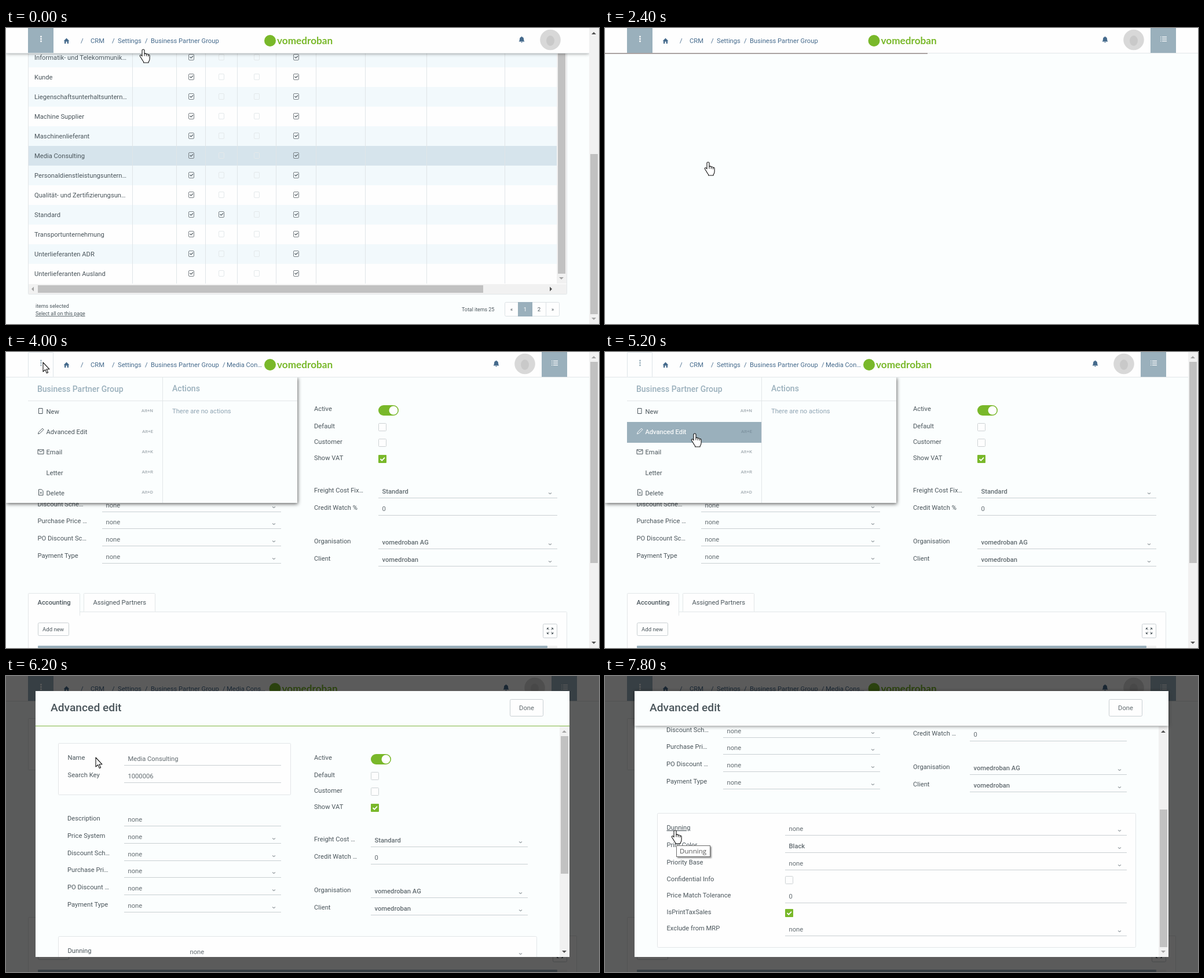
These frames come from a looping animation (1024 px wide and 512 px high, 8000 ms). An HTML page:

```html
<!DOCTYPE html>
<html lang="en">
<head>
<meta charset="utf-8">
<title>Advanced edit</title>
<style>
html, body { margin: 0; width: 100%; height: 100%; overflow: hidden; background: #fbfefe; }
svg { display: block; width: 100%; height: 100%; font-family: Roboto, sans-serif; }
.raised { filter: drop-shadow(0 1px 3px #0007); }
</style>
</head>
<body>
<svg id="stage" viewBox="0 0 1024 512"></svg>
<script>
const LOOP = 8000, STEP = 200;
const PAGE = '#fbfefe', WHITE = '#fefefe', LINE = '#e2e6e8', EDGE = '#c9cfd2';
const STEEL = '#9ab0bc', LINK = '#456a8c', LABEL = '#4a555b', VALUE = '#626b70', GREEN = '#79b82a';
const BRAND = 'vomedroban';

// Drawing helpers; text is placed by the middle of its capitals.
const rect = (x, y, w, h, fill, extra = '') =>
  `<rect x="${x}" y="${y}" width="${w}" height="${h}" fill="${fill}" ${extra}/>`;
const box = (x, y, w, h, fill = WHITE, stroke = LINE, r = 1) =>
  rect(x + .5, y + .5, w - 1, h - 1, fill, `stroke="${stroke}" rx="${r}"`);
const path = (d, stroke, extra = '') => `<path d="${d}" fill="none" stroke="${stroke}" ${extra}/>`;
const disc = (x, y, r, fill) => `<circle cx="${x}" cy="${y}" r="${r}" fill="${fill}"/>`;
const text = (x, y, str, fill = LABEL, size = 11.2, extra = '') =>
  `<text x="${x}" y="${y + size * .355}" fill="${fill}" font-size="${size}" ${extra}>${str}</text>`;
const at = (x, y, content, extra = '') => `<g transform="translate(${x} ${y}) ${extra}">${content}</g>`;
const MEDIUM = 'font-weight="500"', MIDDLE = 'text-anchor="middle"', END = 'text-anchor="end"';

const arrow = (x, y, turn, dark) =>
  at(x, y, `<path d="M-4 2L0-2L4 2z" fill="${dark ? '#505050' : '#a3a3a3'}"/>`, `rotate(${turn})`);
const scrollbar = (x, y, h, from, to, up, down) =>
  rect(x, y, 17, h, '#f1f1f1') + rect(x + 2, from, 13, to - from, '#c1c1c1') +
  arrow(x + 8, y + 9, 0, up) + arrow(x + 8, y + h - 9, 180, down);

function header(width, { button = true, shadow = false, open = false, last = '' } = {}) {
  const right = width - 38, avatar = right - (button ? 44 : 0) - 29, bell = avatar - 49.5;
  const shift = (width - 1007) / 2;
  let out = rect(0, 0, width, 43, WHITE, shadow ? 'class="raised"' : '') + rect(0, 43, width, 1, LINE);
  out += open ? box(38, 0, 44, 44, WHITE, '#dde4e8') : rect(38, 0, 44, 43, STEEL);
  for (const y of [15, 19, 23]) out += disc(60.5, y, 1.4, open ? STEEL : WHITE);
  out += `<path d="M99.500 22.500L104.500 17.500L109.500 22.500H108V27H105.700V23.500H103.300V27H101V22.500z" fill="${LINK}"/>`;
  const crumbs = [[129, '/'], [146, 'CRM'], [183, '/'], [193, 'Settings'], [240, '/'], [250, 'Business Partner Group']];
  if (last) crumbs.push([374, '/'], [381, last]);
  for (const [x, str] of crumbs) out += text(x, 22, str, LINK);
  out += disc(456 + shift, 22, 10, GREEN) +
    text(468 + shift, 21.5, BRAND, GREEN, 17.2, 'font-weight="700" style="font-family:Lato,sans-serif"');
  out += at(bell, 20, `<path d="M-5 3.500Q-3.500 2-3.500-1Q-3.500-4-.8-4.600Q0-6.500.8-4.600Q3.500-4 3.500-1Q3.500 2 5 3.500zM-1.500 4.300h3q-1.500 2.400-3 0z" fill="${LINK}"/>`);
  out += disc(avatar, 20.5, 17.8, '#d8d8d8') + `<ellipse cx="${avatar}" cy="22" rx="7" ry="9" fill="#c9c9c9"/>`;
  if (button) {
    out += rect(right - 44, 0, 44, 43, STEEL);
    for (const y of [15.5, 19, 22.5])
      out += rect(right - 27, y - .6, 1.5, 1.3, WHITE) + rect(right - 24, y - .6, 8, 1.3, WHITE);
  }
  return out;
}

const tick = (x, y, on) => on
  ? box(x - 5, y - 5, 10, 11, 'none', '#7b8287', 1.5) + path(`M${x - 2.5} ${y}l2 2 3.500-3.500`, '#555e63', 'stroke-width="1.2"')
  : box(x - 5, y - 5, 10, 11, 'none', '#e4e9eb', 1.5);

function table() {
  const names = ['Informatik- und Telekommunik…', 'Kunde', 'Liegenschaftsunterhaltsuntern…', 'Machine Supplier',
    'Maschinenlieferant', 'Media Consulting', 'Personaldienstleistungsuntern…', 'Qualität- und Zertifizierungsun…',
    'Standard', 'Transportunternehmung', 'Unterlieferanten ADR', 'Unterlieferanten Ausland'];
  let out = box(38, 30, 931, 431, WHITE);
  names.forEach((name, i) => {
    const y = 34 + 34 * i;
    out += rect(39, y, 912, 34, i === 5 ? '#d6e4ec' : i % 2 ? WHITE : '#f2f9fc') + text(49, y + 17, name);
    out += tick(320, y + 16, true) + tick(372, y + 16, name === 'Standard') +
      tick(433, y + 16, false) + tick(501, y + 16, true);
  });
  for (const x of [218, 294, 344, 399, 466, 535, 620, 726, 861]) out += rect(x, 34, 1, 408, '#dfe5e8');
  out += scrollbar(951, 30, 412, 40, 425, false, false) + rect(39, 443, 929, 17, '#f1f1f1') +
    rect(55, 445, 769, 13, '#c1c1c1') + arrow(46, 451.5, -90, false) + arrow(941, 451.5, 90, true);
  out += text(51, 481, 'items selected', LABEL, 8.9) +
    text(51, 494, 'Select all on this page', LABEL, 8.8, 'text-decoration="underline"') +
    text(787, 487, 'Total items 25', LABEL, 8.9);
  out += box(861, 474, 95, 25, WHITE, '#dbe1e4', 2) + rect(884, 474, 25, 25, STEEL) + rect(932, 474, 1, 25, '#dbe1e4');
  [['«', 873], ['1', 896.5], ['2', 920.5], ['»', 944]].forEach(([str, x]) =>
    out += text(x, 487, str, str === '1' ? WHITE : LABEL, 9.6, MIDDLE));
  return out + header(1007, { button: false, shadow: true }) + scrollbar(1007, 0, 512, 218, 495, true, false);
}

const checkbox = (x, y, on) => on
  ? rect(x, y - 7, 14, 14, GREEN, 'rx="1"') + path(`M${x + 3.5} ${y}l2.700 2.700 4.800-5`, WHITE, 'stroke-width="1.8"')
  : box(x, y - 7, 14, 14, WHITE, '#cdd2d4');

function field(label, y, labelX, x, right, value, { menu = true, bold = false, hover = false } = {}) {
  let out = text(labelX, y, label, LABEL, 11.2, hover ? 'text-decoration="underline"' : '') +
    text(x + 6.5, y + 2.5, value, VALUE, 11.2, bold ? MEDIUM : '') + rect(x, y + 13, right - x, 1, EDGE);
  if (menu) out += path(`M${right - 15} ${y + 4.5}l2.500 2 2.500-2`, '#9aa1a5', 'stroke-width="1.2"');
  return out;
}

// The record form, shared by the page and the dialog.
function form({ boxX, labelX, x, rightX, left, right }) {
  const plain = { menu: false }, bold = { bold: true }, wide = rightX + 271 + (labelX < 60 ? 38 : 0);
  let out = box(boxX, 116, 492 - boxX, 90) +
    field('Name', 141, labelX + .5, x, 475, 'Media Consulting', plain) +
    field('Search Key', 171, labelX + .5, x, 475, '1000006', plain);
  left.forEach((label, i) => out += field(label, Math.round(246 + 29.8 * i), labelX, x, 475, 'none', { menu: i > 0 }));
  [['Active', 141], ['Default', 171], ['Customer', 198], ['Show VAT', 226]].forEach(([label, y]) => out += text(532, y, label));
  out += rect(rightX, 135, 35, 18, GREEN, 'rx="9"') + disc(rightX + 26, 144, 7.5, WHITE) +
    checkbox(rightX, 173, false) + checkbox(rightX, 200, false) + checkbox(rightX, 228, true);
  return out + field(right[0], 282, 532, rightX, wide, 'Standard', bold) +
    field(right[1], 312, 532, rightX, wide, '0', plain) +
    field('Organisation', 370, 532, rightX, wide, BRAND + ' AG', bold) +
    field('Client', 400, 532, rightX, wide, BRAND, bold);
}

function record(width) {
  const right = width - 38;
  let out = at(0, -43, form({
    boxX: 38, labelX: 54.5, x: 166, rightX: 643,
    left: ['Description', 'Price System', 'Discount Sche…', 'Purchase Price …', 'PO Discount Sc…', 'Payment Type'],
    right: ['Freight Cost Fix…', 'Credit Watch %']
  }));
  out += box(38, 449, right - 38, 80) + box(134, 417, 124, 33) + box(38, 417, 90, 40) + rect(39, 448, 88, 10, WHITE) +
    text(54.5, 433.5, 'Accounting', LABEL, 11.2, MEDIUM) + text(150.5, 433.5, 'Assigned Partners');
  out += box(55, 468, 54, 23, WHITE, EDGE, 2) + text(63, 480, 'Add new', LABEL, 9.6) + box(right - 42, 470, 25, 25, WHITE, EDGE, 2);
  for (const turn of [0, 90, 180, 270])
    out += at(right - 29.5, 482.5, path('M1.500-1.500L5-5M2-5H5V-2', LABEL), `rotate(${turn})`);
  return out + rect(55, 508, right - 89, 4, STEEL, 'rx="1"') + rect(right - 34, 508, 17, 4, '#f1f1f1');
}

function menu(cursor) {
  const items = [['New', 'N', 'M-3.500-4.500h6.500v9h-6.500z'], ['Advanced Edit', 'E', 'M-4.500 4.500l.8-3L3-5l2 2-6.500 6.500z'],
    ['Email', 'K', 'M-5-3.500H5V4H-5zL0 .5 5-3.500'], ['Letter', 'R', ''],
    ['Delete', 'D', 'M-3.500-5H1.500L4-2.500V5H-3.500zM-1.500-1l3.500 3.500M2-1l-3.500 3.500']];
  let out = rect(0, 43, 503, 218, PAGE, 'style="filter:drop-shadow(1px 2px 3px #0009)"') +
    rect(38, 84, 465, 1, LINE) + rect(270, 43, 1, 218, LINE) +
    text(54, 64, 'Business Partner Group', STEEL, 14, MEDIUM) + text(287, 63.5, 'Actions', STEEL, 14, MEDIUM) +
    text(287, 102, 'There are no actions', '#8fa4b3');
  items.forEach(([name, key, icon], i) => {
    const y = 103 + 35.2 * i;
    const hover = cursor.x > 38 && cursor.x < 270 && Math.abs(cursor.y - y) < 17.6;
    const ink = hover ? WHITE : LABEL;
    if (hover) out += rect(38, Math.round(y - 17.6), 232, 36, STEEL);
    out += at(60, y - 1, path(icon, ink)) + text(69.5, y, name, ink, 11.2, hover ? 'stroke="#fff" stroke-width=".2"' : '') +
      text(254, y - 1.5, 'Alt+' + key, hover ? '#7d929f' : '#a3acb2', 8, MEDIUM + ' ' + END);
  });
  return out;
}

function dialog(scroll, filled, cursor, tip) {
  let out = record(1024) + header(1024, { last: 'Media Cons…' }) + rect(0, 0, 1024, 512, '#000', 'opacity=".64"') +
    rect(51, 26, 922, 460, PAGE);
  if (filled) {
    const hover = scroll === 213 && cursor.x < 150 && cursor.y > 255;
    let body = form({
      boxX: 90, labelX: 106, x: 204, rightX: 630,
      left: ['Description', 'Price System', 'Discount Sch…', 'Purchase Pri…', 'PO Discount …', 'Payment Type'],
      right: ['Freight Cost …', 'Credit Watch …']
    }) + box(90, 450, 827, 233, WHITE, LINE, 2);
    const row = (label, y, value, options) => body += field(label, y, 106.5, 311, 901, value, options);
    row('Dunning', 475, 'none', { hover });
    row('Print Color', 505, 'Black', { bold: true });
    row('Priority Base', 535, 'none');
    row('Price Match Tolerance', 592, '0', { menu: false });
    row('Exclude from MRP', 649, 'none');
    body += text(106.5, 564, 'Confidential Info') + checkbox(311, 566, false) +
      text(106.5, 621, 'IsPrintTaxSales') + checkbox(311, 623, true);
    out += '<clipPath id="body"><rect x="51" y="87" width="922" height="399"/></clipPath>' +
      `<g clip-path="url(#body)">${at(0, -scroll, body)}</g>`;
    const thumb = 104 + scroll * 127 / 213;
    out += scrollbar(956, 87, 399, thumb, thumb + 238, scroll > 0, scroll < 213);
  }
  out += rect(51, 26, 922, 60, PAGE, scroll ? 'class="raised"' : '');
  if (!scroll) out += rect(51, 86, 922, 1, '#7fb540');
  out += text(77, 54.5, 'Advanced edit', LABEL, 19.2, MEDIUM) + box(870, 40, 58, 30, WHITE, EDGE, 2) +
    text(899, 55.5, 'Done', VALUE, 11.2, MIDDLE);
  if (tip) out += box(123, 293, 59, 20, WHITE, '#6b6b6b', 0).replace('<rect', '<rect style="filter:drop-shadow(2px 2px 1px #0006)"') +
    text(129, 303, 'Dunning', '#575757', 11.6, 'style="font-family:\'Open Sans\',sans-serif"');
  return out;
}

const HAND = 'M-2 2a2 2 0 0 1 4 0v5.500q2.500-1 3.400.8q2.300-.9 3.100 1q2.600-.6 2.600 2v5q0 3-2 5.500v1.200h-8.500v-1.500q-2-2.500-3.500-5.500l-2.600-4q-.8-2.200 1.200-2.200q1.200 0 2.300 2z';
const POINTER = 'M0 0V16l3.700-3.400 2.600 6 2.300-1-2.600-5.800h5z';
function drawCursor({ x, y }, hand) {
  const knuckles = hand ? path('M2 7.500v4M5.400 8.300v3.500M8.500 9.300v3', '#111') : '';
  return at(x, y, `<path d="${hand ? HAND : POINTER}" fill="#fff" stroke="#111" stroke-width="1.1" stroke-linejoin="round"/>` + knuckles);
}

// Linear motion through [time, value...] stops.
function along(stops, t) {
  const i = stops.findIndex(stop => stop[0] > t);
  if (i === 0) return stops[0].slice(1);
  if (i < 0) return stops[stops.length - 1].slice(1);
  const a = stops[i - 1], b = stops[i], k = (t - a[0]) / (b[0] - a[0]);
  return a.slice(1).map((v, n) => v + (b[n + 1] - v) * k);
}
const ROUTE = [[0, 237, 37], [200, 237, 37], [1000, 365, 30], [1200, 365, 30], [2000, 178, 232], [3400, 178, 232],
  [3800, 64, 18], [4600, 64, 18], [5200, 155, 141], [7200, 155, 141], [7600, 121, 267]];

function scene(t) {
  const [x, y] = along(ROUTE, t), cursor = { x, y };
  let out, hand = true;
  if (t < 2400) out = table();
  else if (t < 3000) {
    const [bar] = along([[2400, 557], [2800, 960]], t);
    out = header(1024) + rect(0, 43, bar, 2, '#aaa3a2');
  } else if (t < 5600) {
    const open = t >= 4000;
    hand = open && y > 85;
    out = record(1007) + (open ? menu(cursor) : '') + header(1007, { open, last: 'Media Con…' }) +
      scrollbar(1007, 0, 512, 17, 365, false, true);
  } else {
    const [scroll] = along([[6800, 0], [7400, 213]], t);
    hand = t >= 7600;
    out = dialog(scroll, t >= 6000, cursor, t >= 7800);
  }
  return rect(0, 0, 1024, 512, PAGE) + out + drawCursor(cursor, hand);
}

const stage = document.getElementById('stage');
let shown = -1;
function play() {
  const t = Math.floor(performance.now() % LOOP / STEP) * STEP;
  if (t !== shown) stage.innerHTML = scene(shown = t);
  requestAnimationFrame(play);
}
play();
</script>
</body>
</html>
```
